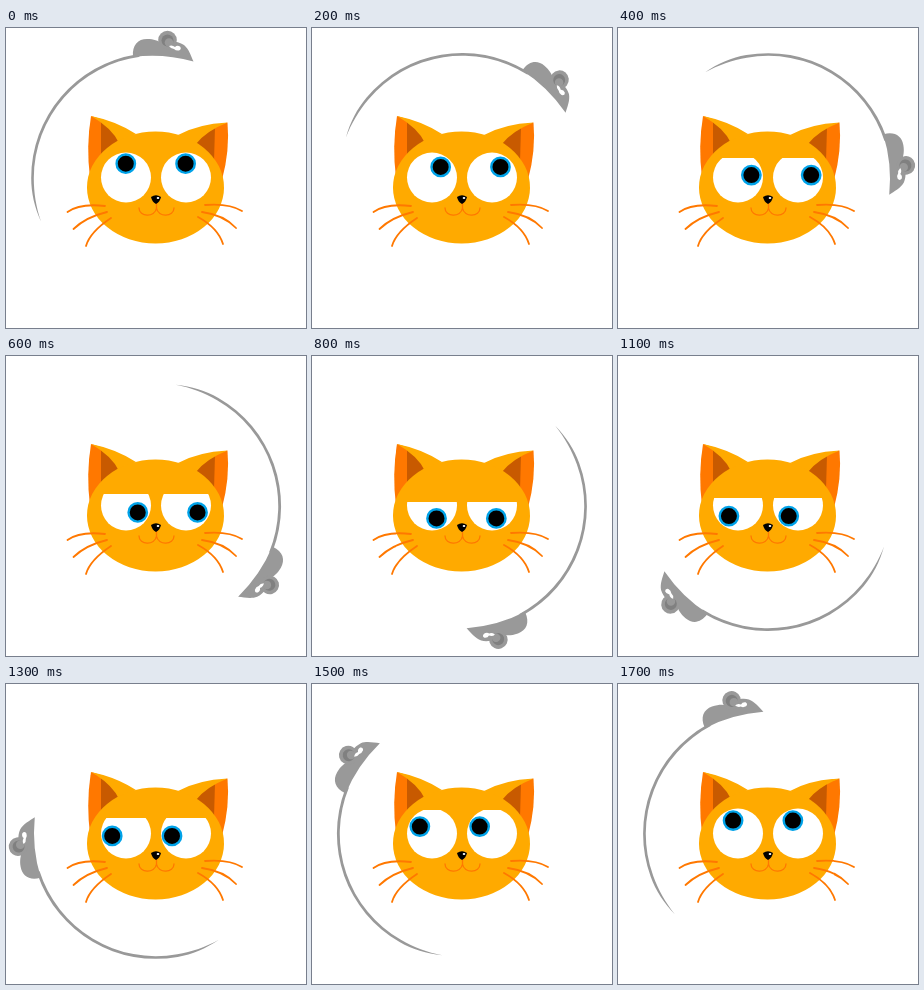
Write an HTML page that moves like this. It is 300 px wide and 300 px high and loops after 1.8 s.

```html
<!DOCTYPE html>
<html lang="en">
<head>
<meta charset="utf-8">
<title>Cat watching a mouse</title>
<style>
  html, body { margin: 0; width: 100%; height: 100%; overflow: hidden; background: #fff; }
  svg { display: block; width: 100vw; height: 100vh; }
  .line { fill: none; stroke: #ff7800; stroke-width: 1.8; stroke-linecap: round; }
</style>
</head>
<body>
<svg viewBox="0 0 300 300">
  <defs>
    <clipPath id="open"><rect id="lid" x="80" y="114" width="140" height="80"/></clipPath>
  </defs>

  <g id="cat">
    <!-- ears -->
    <path fill="#ff7800" d="M85 88L98 92L113 113L84 150Q80 118 85 88Z"/>
    <path fill="#c85a00" d="M95 93L116 112L95 131Z"/>
    <path fill="#ffaa00" d="M85 88Q110 93 130 106L113 115Q106 100 85 88Z"/>
    <path fill="#ff7800" d="M221.500 94.500L208 98L190 114L216 152Q224 122 221.500 94.500Z"/>
    <path fill="#c85a00" d="M209 99L188 114L208 134Z"/>
    <path fill="#ffaa00" d="M221.500 94.500Q192 96 172 107L190 116Q200 103 221.500 94.500Z"/>
    <ellipse cx="149.500" cy="159.500" rx="68.500" ry="56" fill="#ffaa00"/>

    <g clip-path="url(#open)" fill="#fff">
      <circle cx="120" cy="149.500" r="25"/>
      <circle cx="180" cy="149.500" r="25"/>
    </g>
    <g id="pupils" fill="#000" stroke="#00a2e8" stroke-width="2.400">
      <circle cx="119.800" cy="149.500" r="9.200"/>
      <circle cx="179.600" cy="149.500" r="9.200"/>
    </g>

    <!-- mouth, nose, whiskers -->
    <path class="line" style="stroke-width:1.300" d="M133 180C133 189 149 190 150.500 180C152 190 168 189 168 180M150.500 174V181"/>
    <path d="M145 169Q150 165.500 155 169Q154 174 150 176Q146 174 145 169Z"/>
    <ellipse cx="152" cy="170" rx="1.300" ry="1" fill="#fff"/>
    <path class="line" d="M61.500 184Q74 175 99 178M67.500 201Q80 189 101 184M80 218Q84 204 105 190"/>
    <path class="line" d="M199 177Q223 175 236 183M196 184Q218 187 230 200M192 189Q212 200 217 216"/>
  </g>

  <g id="mouse" fill="#999">
    <path d="M35 193.500C28.500 179 25.200 165 25.200 150A124.800 124.800 0 0 1 130 26.500L134 28.800A122.200 122.200 0 0 0 27.800 150C27.800 165 30 179 35 193.500Z"/>
    <path d="M127 28.500C126 17 132 11 141 11C148 11 152 13 156 15C163 12 172 13 178 17C183 21 185 28 187.500 33.500Q157 25 127 29Z"/>
    <circle cx="161.500" cy="12" r="9.300"/>
    <circle cx="161.500" cy="12.500" r="6" fill="#808080"/>
    <circle cx="163" cy="14.500" r="4.300"/>
    <path fill="#fff" d="M163 18Q166 16.500 169 19Q171 17 174 18.500Q176 21 173 22.500Q170 23 168 21Q165 21 163 18Z"/>
  </g>
</svg>
<script>
  const LOOP = 1800, STEP = 100, TURN = 20;
  const [mouse, pupils, lid] = ["mouse", "pupils", "lid"].map(id => document.getElementById(id));
  const R = 13.8;

  function draw(now) {
    const deg = Math.floor((now % LOOP) / STEP) * TURN;
    const a = deg * Math.PI / 180;
    mouse.setAttribute("transform", `rotate(${deg} 150 150)`);
    pupils.setAttribute("transform", `translate(${R * Math.sin(a)} ${-R * Math.cos(a)})`);
    // lids close evenly as the mouse nears the bottom
    lid.setAttribute("y", 114 + 0.2 * Math.min(deg, 360 - deg));
  }

  const start = performance.now();
  function tick() {
    draw(performance.now() - start);
    requestAnimationFrame(tick);
  }
  tick();
</script>
</body>
</html>
```
